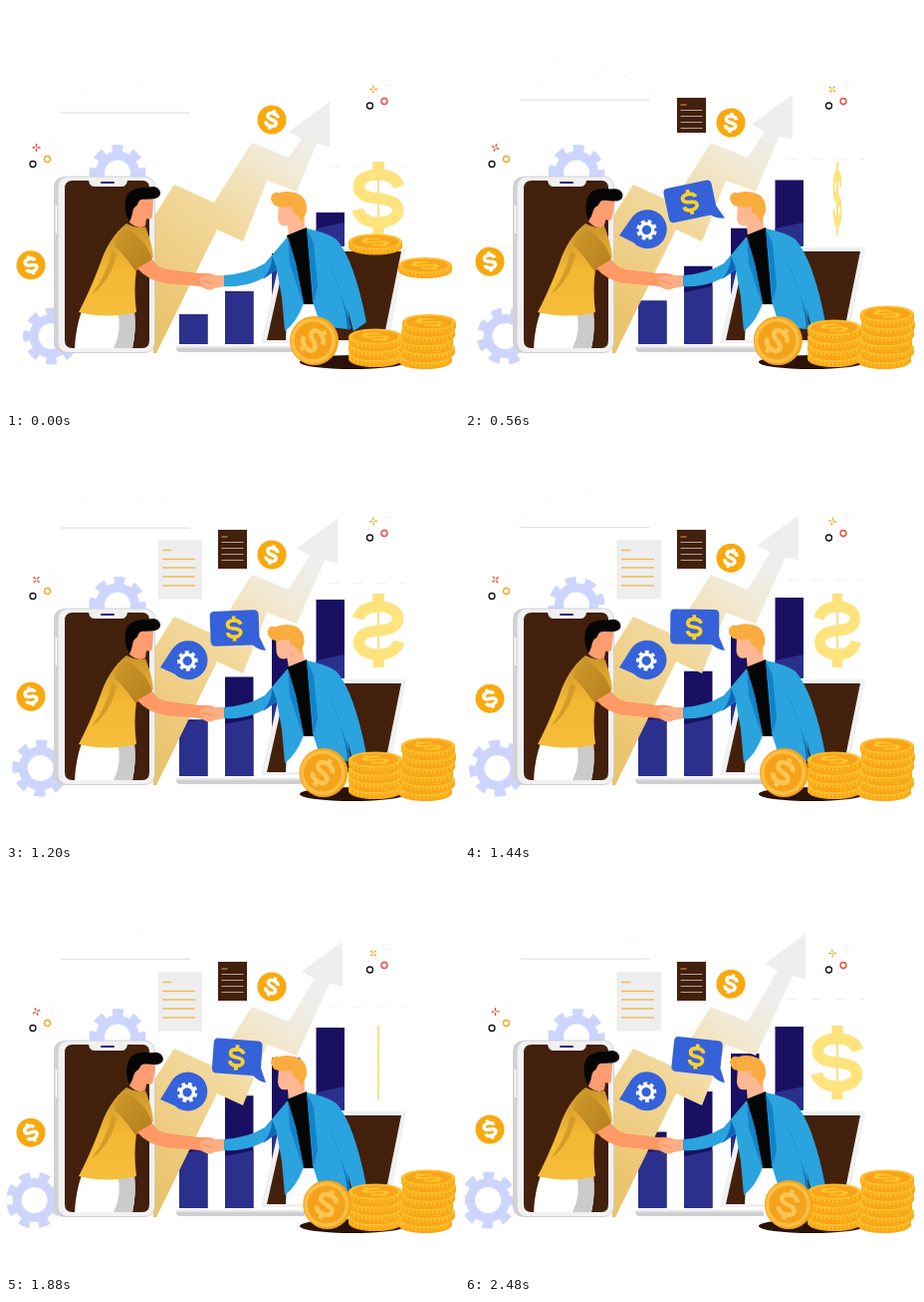
An HTML page for the animation above (2520 ms loop, 455x405 px).

```html
<!DOCTYPE html>
<html lang="en">
<head>
<meta charset="utf-8">
<title>Handshake</title>
<style>
html, body { margin: 0; width: 100%; height: 100%; overflow: hidden; background: #fff; }
svg { display: block; width: 455px; height: 405px; }
.line { fill: none; }
</style>
</head>
<body>
<svg viewBox="0 0 455 405">
<defs>
  <linearGradient id="fade" gradientUnits="userSpaceOnUse" x1="160" y1="325" x2="312" y2="130">
    <stop offset="0" stop-color="#ebc36c"/>
    <stop offset=".5" stop-color="#f2d89c"/>
    <stop offset=".82" stop-color="#f2ead6"/>
    <stop offset="1" stop-color="#eeeeef"/>
  </linearGradient>
  <linearGradient id="shirt" x1="0" y1="0" x2="0" y2="1">
    <stop offset="0" stop-color="#c9942a"/>
    <stop offset=".5" stop-color="#f4b833"/>
    <stop offset="1" stop-color="#f6bd3b"/>
  </linearGradient>
  <linearGradient id="sleeve" x1="0" y1="0" x2="1" y2="1">
    <stop offset="0" stop-color="#cf9a2b"/>
    <stop offset="1" stop-color="#b47e1d"/>
  </linearGradient>
  <path id="dollar" class="line" d="M20-12C17-21 9-24 0-24C-12-24-19-19-19-12C-19-3-10-1 0 0C10 1 19 4 19 12C19 19 11 24 0 24C-10 24-18 20-20 11M0-37V-24M0 24V37"/>
  <g id="gear" class="line">
    <circle r="17.5" stroke-width="9"/>
    <circle r="24.5" stroke-width="8" pathLength="16" stroke-dasharray="1.1 .9" stroke-dashoffset=".55"/>
  </g>
  <g id="slab">
    <path d="M-27 0V5A27 8 0 0 0 27 5V0Z" fill="#f9a916"/>
    <path d="M-25 4A27 8 0 0 0 25 4" class="line" stroke="#ffc93c" stroke-width="4" stroke-dasharray="1 3"/>
    <ellipse rx="27" ry="8" fill="#fdbd2a"/>
    <ellipse rx="23" ry="6.300" fill="#f7a41b"/>
    <use href="#dollar" transform="matrix(.36 -.07 .3 .11 0 0)" stroke="#ffc42c" stroke-width="11"/>
  </g>
  <g id="token">
    <circle r="14.5" fill="#f9a90d"/>
    <use href="#dollar" transform="scale(.27)" stroke="#fff" stroke-width="13"/>
  </g>
  <path id="spark" class="line" d="M-4 0H-1M1 0H4M0-4V-1M0 1V4"/>
  <path id="cloud" class="line" stroke="#dedede" stroke-width=".6" stroke-dasharray="1 7" d="M0 0C-1-10 10-15 19-12C24-26 35-42 51-43C64-43 73-36 76-27C88-34 105-28 110-20C122-25 136-13 137 0"/>
  <clipPath id="darkClip"><rect id="darkReveal" x="210" y="92" width="35" height="0"/></clipPath>
  <clipPath id="paleClip"><rect id="paleReveal" x="150" y="101" width="50" height="0"/></clipPath>
</defs>

<g id="cloudLeft"><use href="#cloud"/><path d="M0 0H130" stroke="#d2d2d2" stroke-width=".8"/></g>
<g id="cloudRight"><use href="#cloud" transform="scale(.57)"/><path d="M0 0H77" stroke="#e4e4e4" stroke-width=".6" stroke-dasharray="10 14"/></g>

<use id="gearTop" href="#gear" stroke="#cdd5fe"/>
<use id="gearLeft" href="#gear" stroke="#cdd5fe"/>

<g id="bars"></g>
<path id="arrow" fill="url(#fade)"/>

<g clip-path="url(#darkClip)">
  <path d="M213 92H242V131H213Z" fill="#42200c"/>
  <path d="M216.500 99H222.500" stroke="#e3a63d"/>
  <path d="M216.500 104.500H238.500M216.500 110.500H238.500M216.500 116.500H238.500M216.500 122.500H238.500" stroke="#b3a299"/>
</g>
<g clip-path="url(#paleClip)">
  <path d="M152.500 102H197V161.500H152.500Z" fill="#eee"/>
  <path d="M157 112.500H166M157 121.500H190M157 130H190M157 139H190M157 148H190" stroke="#f0bd55" stroke-width="1.500"/>
</g>

<!-- phone -->
<rect x="48" y="171" width="100" height="177" rx="10" fill="#d2d2d4"/>
<rect x="52" y="171" width="97.500" height="176.500" rx="10" fill="#f1f1f2" stroke="#c9c9cb" stroke-width=".8"/>
<path d="M50.500 200V228" stroke="#fff" stroke-width="1.500"/>
<path d="M67 175H83Q84 181 89 181H116Q121 181 122 175H137Q144 175 144 183V335Q144 343 137 343H67Q59 343 59 335V183Q59 175 67 175Z" fill="#42200c"/>
<path d="M96 177H108" stroke="#25297e" stroke-width="2" stroke-linecap="round"/>

<!-- laptop -->
<path d="M171 341H300V347H175Q171 347 171 341Z" fill="#cfcfd1"/>
<path d="M171 341H300V343H171Z" fill="#e6e6e7"/>
<path d="M256 338L278 242H402L384 338Z" fill="#f0f0f1"/>
<path d="M262 335L282 246H397L379 335Z" fill="#42200c"/>

<!-- left person -->
<path d="M76 306H129Q131 325 127 343H69Q70 322 76 306Z" fill="#fff"/>
<path d="M112 306H129Q131 325 127 343H108Q117 325 112 306Z" fill="#cbcbcb"/>
<g id="headLeft">
  <path d="M126 200L124 217Q134 225 140 220L141 213Q147 215 147 210L148 194Q140 187 130 191Z" fill="#ff9c70"/>
  <path d="M124 216C119 208 118 197 122 189C127 182 137 182 143 182C150 179 157 184 154.500 190C151 195 144 193 136 194C132 195 133 200 130 201C126 204 128 210 124 216Z" fill="#050505"/>
</g>
<path d="M121 218Q133 224 140 221Q146 235 148 252L131 264Q128 285 131 307Q103 314 73 307Q84 286 94 260Q103 232 121 218Z" fill="url(#shirt)"/>
<path d="M119 221Q111 229 109 240Q120 251 130 266L147 255Q143 236 119 221Z" fill="url(#sleeve)"/>
<path d="M106 246Q101 270 86 289Q105 276 111 249Z" fill="#d69c2a"/>
<path d="M132 263L147 254Q152 262 161 264L194 268Q205 267 212 271L210 282Q203 286 195 281L160 278Q142 275 132 263Z" fill="#ff9a66"/>

<!-- right person -->
<path d="M283 295H316L321 335H281Z" fill="#fff"/>
<g id="headRight">
  <path d="M274 198L273 213Q274 222 283 220L284 233H301L299 205L296 195Z" fill="#ffb793"/>
  <path d="M266.500 190Q270 185 274 187.500Q285 184 295 189Q303 194 302 206L297 217Q293 208 288 207L287 201Q278 203 270 200Q265 195 266.500 190Z" fill="#f9ad3f"/>
</g>
<path d="M282 230L302 222L309 240V299H297L284 260Z" fill="#050505"/>
<path d="M283 231Q272 244 260 258Q244 268 219 270V281Q248 283 272 264L277 292L280 326Q292 317 299 298L291 258Z" fill="#2aa3df"/>
<path d="M283 232L285 258L298 298L291 258Z" fill="#1183c9"/>
<path d="M272 263Q265 270 258 274Q268 262 267 250Z" fill="#0c69b8"/>
<path d="M302 223Q322 227 332 234Q350 255 362 317L349 326L343 303Q346 317 343 324L316 321L308 296Z" fill="#2aa3df"/>
<path d="M323 255Q337 286 347 323L343 325Q341 292 323 255Z" fill="#0d70bf"/>
<path d="M302 223L309 297L313 281L309 238Z" fill="#1183c9"/>
<path d="M219 270L208 270Q198 269 194 274L197 281Q203 287 209 283L219 281Z" fill="#ffad83"/>
<path d="M197 276Q202 275 207 279" class="line" stroke="#f28a5d"/>

<!-- speech bubbles -->
<g id="bubbleRound">
  <path d="M155 230L167 213A19.500 19.500 0 1 1 169 237Z" fill="#3562d9"/>
  <g transform="translate(182.500 224.500)"><use id="gearSmall" href="#gear" stroke="#fff"/></g>
</g>
<g id="bubbleBox">
  <path d="M210 172H250Q255 172 255 177V199L261 213Q253 212 248 207H211Q206 207 206 202V177Q206 172 210 172Z" fill="#3562d9"/>
  <use href="#dollar" transform="translate(230 190) scale(.34)" stroke="#ffd02b" stroke-width="11"/>
</g>

<g transform="translate(374 193)">
  <path d="M0-37V37" stroke="#f6d774" stroke-width="1.600"/>
  <use id="bigDollar" href="#dollar" stroke="#ffe37d" stroke-width="11"/>
</g>

<!-- coins -->
<ellipse cx="348" cy="357" rx="53" ry="7" fill="#2a1206"/>
<g id="stacks"></g>
<use id="dropLeft" href="#slab"/>
<use id="dropRight" href="#slab"/>
<g id="roller">
  <circle r="24.500" fill="#f5a51a"/>
  <circle cx="-1" r="22.500" fill="#fdbf45"/>
  <circle cx="-1" r="19" fill="#f5a21b"/>
  <use id="rollerSign" href="#dollar" stroke="#fdc654" stroke-width="11"/>
</g>
<use id="tokenTop" href="#token"/>
<use id="tokenLeft" href="#token"/>

<!-- ornaments -->
<g class="line" stroke-width="1.300">
  <use id="sparkLeft" href="#spark" stroke="#f0452f"/>
  <use id="sparkRight" href="#spark" stroke="#f5a623"/>
  <circle cx="27" cy="158.500" r="3" stroke="#111"/>
  <circle cx="41.500" cy="153.500" r="3" stroke="#f5a623"/>
  <circle cx="365.500" cy="100" r="3" stroke="#111"/>
  <circle cx="380" cy="95.500" r="3" stroke="#f0452f"/>
  <path d="M383.500 76V83M380 79.500H387M45.500 136V143" stroke="#ddd" stroke-width=".7" stroke-dasharray="1 2"/>
</g>
</svg>
<script>
const LOOP = 2520, TAU = Math.PI * 2;
const $ = id => document.getElementById(id);
const clamp = v => Math.max(0, Math.min(1, v));
const ramp = (t, from, to) => clamp((t - from) / (to - from));
const smooth = v => v * v * (3 - 2 * v);
const move = (id, value) => $(id).setAttribute('transform', value);

function add(parent, tag, attrs) {
  const node = document.createElementNS('http://www.w3.org/2000/svg', tag);
  for (const key in attrs) node.setAttribute(key, attrs[key]);
  return $(parent).appendChild(node);
}

// Linear interpolation through [time, value] points.
function track(points, t) {
  const i = Math.max(1, points.findIndex(p => p[0] >= t));
  const [a, b] = [points[i - 1], points[i]];
  return a[1] + (b[1] - a[1]) * (t - a[0]) / (b[0] - a[0]);
}

// x, foot, top edge of the lighter part, bar top over the loop
const bars = [
  [174, 339, 282, u => 309 - 65 * u + 18 * u * u],
  [220, 339, 284, u => 222 + 64 * (1 - u) ** 2],
  [267, 300, 260, u => 184 + 64 * (1 - u) ** 2],
  [311.5, 241, 220, u => 156.5 + 50.5 * Math.exp(-u * 4.67)]
].map(([x, foot, edge, top]) => ({
  x, foot, edge, top,
  back: add('bars', 'path', { fill: '#1a1063' }),
  front: add('bars', 'path', { fill: '#2b308c' })
}));

[[371, 349], [371, 340], [371, 331.5],
 [421, 351], [424, 342.5], [422, 334], [424, 325.5], [425, 317]].forEach(([x, y]) =>
  add('stacks', 'use', { href: '#slab', x, y }));

const bob = [[0, 114], [560, 117], [880, 115], [1200, 117], [1640, 123], [1880, 117], [LOOP, 114]];

function draw(t) {
  const u = t / LOOP, wave = Math.sin(TAU * u);

  move('cloudLeft', `translate(55 ${89 + 18 * Math.exp(-t / 440)})`);
  move('cloudRight', `translate(324 ${161 - 32 * u})`);
  move('gearTop', `translate(112 167.5) rotate(${-180 * u})`);
  move('gearLeft', `translate(${45.5 - 22.7 * u} 331) rotate(${-90 * u})`);

  const dx = 17.2 * u, dy = -32.5 * u;
  const head = [[297, 133], [284, 126], [325, 96], [325, 141], [312, 138]]
    .map(([x, y]) => `${x + dx} ${y + dy}`).join('L');
  $('arrow').setAttribute('d', `M148 348V212L169 179L209 197L247 137L284 152L${head}L292 186L262 175L238 236L212 224L151 348Z`);

  for (const { x, foot, edge, top, back, front } of bars) {
    const y = top(u), right = x + 28.5;
    back.setAttribute('d', `M${x} ${y}H${right}V${foot}H${x}Z`);
    front.setAttribute('d', `M${x} ${Math.max(y, edge + 3)}L${right} ${Math.max(y, edge - 3)}V${foot}H${x}Z`);
  }

  $('darkReveal').setAttribute('height', 40 * ramp(t, 280, 600));
  $('paleReveal').setAttribute('height', 61 * ramp(t, 600, 1020));

  const nod = Math.sin(Math.PI * clamp((u * 2 % 1) / .72)) ** 2;
  move('headLeft', `rotate(${8 * nod} 132 217)`);
  const bow = smooth(ramp(t, 600, 840)) * (1 - smooth(ramp(t, 1260, 1560)));
  move('headRight', `rotate(${-6 * bow} 290 227)`);

  const swing = 1 - (1 - ramp(t, 560, LOOP)) ** 2;
  move('bubbleRound', `translate(156 230) rotate(${-4 * swing}) scale(${smooth(ramp(t, 80, 360))}) translate(-156 -230)`);
  move('gearSmall', `rotate(${90 * u}) scale(.36)`);
  move('bubbleBox', `translate(259 213) rotate(${-12 + 18 * swing}) scale(${smooth(ramp(t, 160, 440))}) translate(-259 -213)`);

  move('bigDollar', `scale(${1.04 * Math.cos(TAU * u)} 1)`);

  const fallLeft = ramp(t, 0, 480) ** 1.5, fallRight = ramp(t, 0, 400) ** 1.5;
  move('dropLeft', `translate(371 ${236.5 + 86 * fallLeft})`);
  move('dropRight', `translate(${421 + 3 * fallRight} ${260 + 48.5 * fallRight})`);

  const roll = 23.5 * u - 7.5 * u * u;
  move('roller', `translate(${309.5 + roll} 335.5)`);
  move('rollerSign', `translate(-1 0) rotate(${55 - roll * 2.34}) scale(.42)`);

  move('tokenTop', `translate(267 ${track(bob, t)}) rotate(${15 - 8 * wave})`);
  move('tokenLeft', `translate(25 ${259.7 - 3.5 * wave}) rotate(${-17 + 10 * wave})`);
  move('sparkLeft', `translate(30.5 142) rotate(${90 * u})`);
  move('sparkRight', `translate(369 83.5) rotate(${180 * u})`);
}

function tick() {
  const t = performance.now() % LOOP;
  draw(t - t % 40);
  requestAnimationFrame(tick);
}
tick();
</script>
</body>
</html>
```
